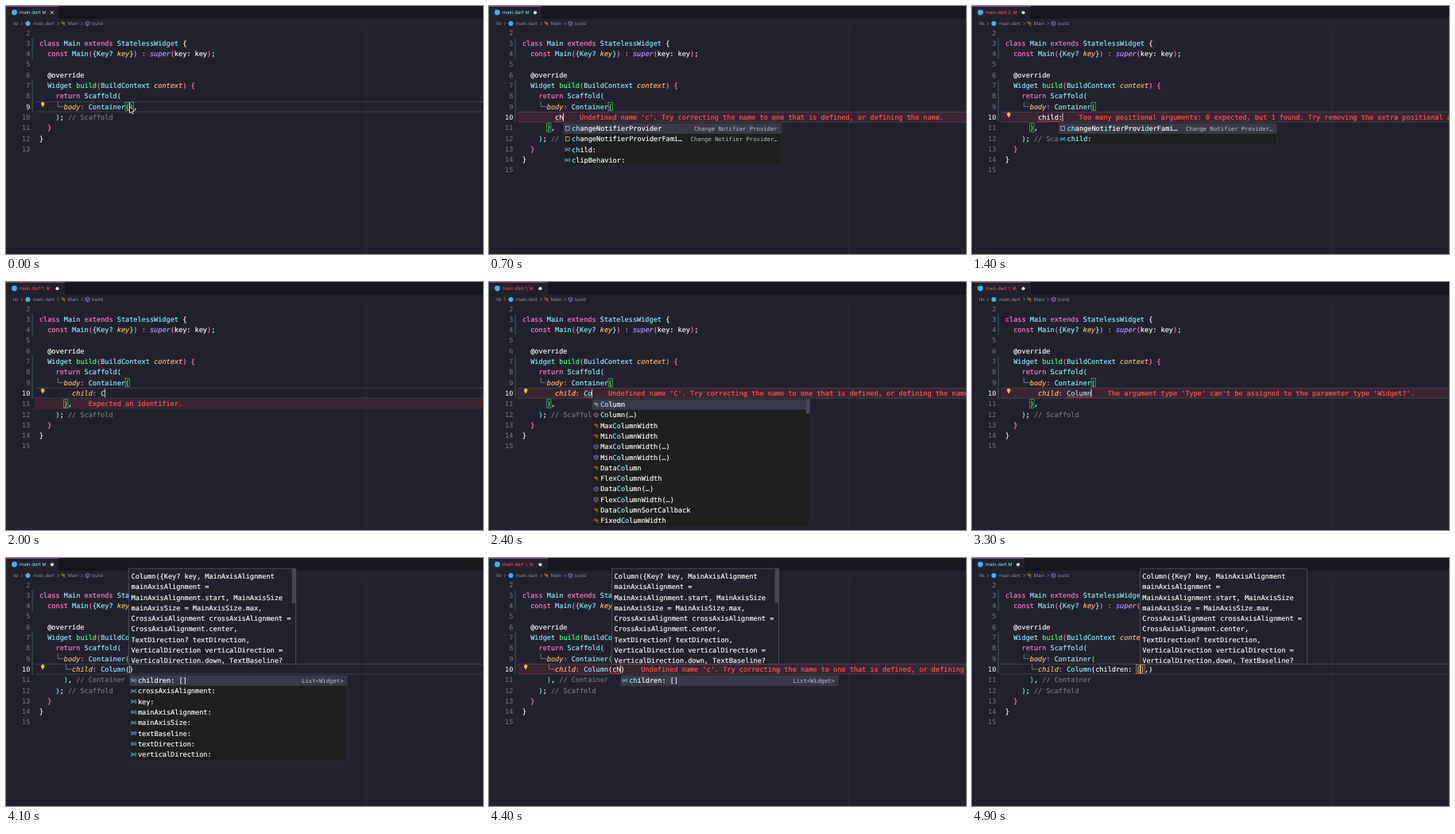
An HTML page with a canvas for the animation above (5000 ms loop, 600 px wide and 312 px high).

```html
<!DOCTYPE html>
<html lang="en">
<head>
<meta charset="utf-8">
<style>
html, body { margin: 0; width: 100%; height: 100%; overflow: hidden; background: #22222d; }
canvas { display: block; width: 600px; height: 312px; }
</style>
</head>
<body>
<canvas id="stage"></canvas>
<script>
const W = 600, H = 312, LOOP = 5000;
const CW = 5.15, LH = 13.3, LEFT = 41.9;
const MONO = '"DejaVu Sans Mono", monospace';
const SANS = 'Inter, "Open Sans", sans-serif';
const C = {
  w: '#f8f8f2', p: '#ff79c6', c: '#8be9fd', g: '#50fa7b', o: '#ffb86c',
  v: '#bd93f9', k: '#74747e', bg: '#22222d', strip: '#17171e', red: '#ff5555',
  list: '#1f1f20', edge: '#2c2c32', tipEdge: '#5a5a63', dim: '#8a8a9a'
};

const canvas = document.getElementById('stage');
const ctx = canvas.getContext('2d');
const dpr = window.devicePixelRatio || 1;
canvas.width = W * dpr;
canvas.height = H * dpr;
ctx.scale(dpr, dpr);
ctx.textRendering = 'geometricPrecision';

const colX = n => LEFT + n * CW;
const rowY = n => 33.5 + (n - 2) * LH;
const rowTop = n => rowY(n) - LH / 2;

function rect(x, y, w, h, color) {
  ctx.fillStyle = color;
  ctx.fillRect(x, y, w, h);
}

function frame(x, y, w, h, color, width = 0.7) {
  ctx.strokeStyle = color;
  ctx.lineWidth = width;
  ctx.strokeRect(x, y, w, h);
}

function dot(x, y, r, color) {
  ctx.fillStyle = color;
  ctx.beginPath();
  ctx.arc(x, y, r, 0, Math.PI * 2);
  ctx.fill();
}

function path(points, color, width = 0.7) {
  ctx.strokeStyle = color;
  ctx.lineWidth = width;
  ctx.beginPath();
  points.forEach(([x, y]) => ctx.lineTo(x, y));
  ctx.stroke();
}

function text(s, x, y, color, font, align = 'left') {
  ctx.font = font;
  ctx.fillStyle = color;
  ctx.textAlign = align;
  ctx.fillText(s, x, y);
}

// A hairline outline gives the code its slightly heavier weight.
function mono(s, x, y, color, italic) {
  text(s, x, y + 3, color, (italic ? 'italic ' : '') + '8.55px ' + MONO);
  ctx.strokeStyle = color;
  ctx.lineWidth = 0.18;
  ctx.strokeText(s, x, y + 3);
}

// Spans are "style:text" joined by "|"; an upper-case style means italic.
const spans = src => src.split('|').map(s => [s[0], s.slice(2)]);

function code(row, col, src) {
  for (const [style, s] of spans(src)) {
    const key = style.toLowerCase();
    mono(s, colX(col), rowY(row), C[key], style !== key);
    col += s.length;
  }
}

const HEAD = [
  [3, 0, 'p:class |c:Main |p:extends |c:StatelessWidget |w:{'],
  [4, 2, 'p:const |c:Main|p:(|c:{Key? |O:key|c:}|p:) : |V:super|p:(|w:key: key|p:)|w:;'],
  [6, 2, 'w:@override'],
  [7, 2, 'c:Widget |g:build|p:(|c:BuildContext |O:context|p:) {'],
  [8, 4, 'p:return |c:Scaffold('],
  [9, 6, 'O:body|p:: |c:Container|g:(']
];

const FIELD = 'f', CLS = 'c', CTOR = 'm', SNIP = 's';
const family = [SNIP, 'changeNotifierProviderFami…', 'Change Notifier Provider…'];
const child = [FIELD, 'child:'];
const chMenu = [
  [SNIP, 'changeNotifierProvider', 'Change Notifier Provider'],
  family, child, [FIELD, 'clipBehavior:']
];
const columnMenu = [
  [CLS, 'Column'], [CTOR, 'Column(…)'], [CLS, 'MaxColumnWidth'], [CLS, 'MinColumnWidth'],
  [CTOR, 'MaxColumnWidth(…)'], [CTOR, 'MinColumnWidth(…)'], [CLS, 'DataColumn'],
  [CLS, 'FlexColumnWidth'], [CTOR, 'DataColumn(…)'], [CTOR, 'FlexColumnWidth(…)'],
  [CLS, 'DataColumnSortCallback'], [CLS, 'FixedColumnWidth']
];
const children = [FIELD, 'children: []', 'List<Widget>'];
const cross = [FIELD, 'crossAxisAlignment:'];
const argMenu = [children, cross].concat(
  ['key:', 'mainAxisAlignment:', 'mainAxisSize:', 'textBaseline:', 'textDirection:', 'verticalDirection:']
    .map(s => [FIELD, s]));

const SIGNATURE = [
  'Column({Key? key, MainAxisAlignment', 'mainAxisAlignment =',
  'MainAxisAlignment.start, MainAxisSize', 'mainAxisSize = MainAxisSize.max,',
  'CrossAxisAlignment crossAxisAlignment =', 'CrossAxisAlignment.center,',
  'TextDirection? textDirection,', 'VerticalDirection verticalDirection =',
  'VerticalDirection.down, TextBaseline?'
];

const undef = s => [10, `Undefined name '${s}'. Try correcting the name to one that is defined, or defining the name.`];
const extra = [10, 'Too many positional arguments: 0 expected, but 1 found. Try removing the extra positional arguments.'];
const noIdent = [11, 'Expected an identifier.'];
const badType = [10, "The argument type 'Type' can't be assigned to the parameter type 'Widget?'."];
const menu = (col, query, items) => ({ col, query, items });
const arg = rest => 'O:child|p:: |' + rest;
const call = rest => arg('c:Column|w:(|' + rest + '|w:)');
const list = 'w:children: |o:[]|w:,';

// Each step overrides part of the editor state from its time on.
const steps = [
  [0, { open: false, mouse: true, line: '', caret: 22, bulb: true, errors: 0, err: null, menu: null, sig: 0, tree: false, label: false }],
  [200, { open: true, mouse: false, bulb: false, caret: 8 }],
  [500, { line: 'w:c', caret: 9 }],
  [600, { err: undef('c') }],
  [700, { line: 'w:ch', caret: 10, menu: menu(10, 'ch', chMenu) }],
  [800, { errors: 1 }],
  [900, { line: 'w:chi', caret: 11, menu: menu(11, 'chi', chMenu), err: undef('ch') }],
  [1000, { line: 'w:chil', caret: 12, menu: menu(12, 'chil', [family, child]) }],
  [1200, { line: 'w:child', caret: 13, menu: menu(13, 'child', [family, child]), err: extra, errors: 2, bulb: true }],
  [1400, { line: 'w:child:', caret: 14 }],
  [1500, { menu: null }],
  [1600, { line: arg('w: '), caret: 15 }],
  [1700, { err: noIdent }],
  [1900, { errors: 1 }],
  [2000, { line: arg('C:C'), caret: 16 }],
  [2200, { menu: menu(16, 'c', columnMenu), err: undef('C') }],
  [2300, { line: arg('C:Co'), caret: 17, menu: menu(17, 'co', columnMenu) }],
  [2500, { line: arg('C:Col'), caret: 18, menu: menu(18, 'col', columnMenu), err: undef('Co') }],
  [2600, { line: arg('C:Colu'), caret: 19, menu: menu(19, 'colu', columnMenu) }],
  [2700, { line: arg('C:Colum'), caret: 20, menu: menu(20, 'colum', columnMenu), err: undef('Colum') }],
  [3000, { line: arg('c:Column'), caret: 21, menu: menu(21, 'column', columnMenu) }],
  [3300, { menu: null, err: badType }],
  [3700, { line: call('w:'), caret: 22, sig: 22, menu: menu(22, '', argMenu) }],
  [3800, { err: null, errors: 0, tree: true, label: true }],
  [4200, { line: call('w:c'), caret: 23, menu: menu(23, 'c', [children, cross]) }],
  [4400, { line: call('w:ch'), caret: 24, menu: menu(24, 'ch', [children]), err: undef('c'), errors: 1 }],
  [4600, { line: call(list), caret: 33, menu: null, sig: 33, err: null, tree: false, bulb: false }],
  [4900, { errors: 0, tree: true }]
];

const stateAt = t => Object.assign({}, ...steps.filter(s => s[0] <= t).map(s => s[1]));

function classIcon(x, y, color) {
  path([[x - 2.5, y - 1], [x - 1, y - 2.6], [x + 0.4, y - 1.2], [x - 1.1, y + 0.4], [x - 2.5, y - 1]], color);
  path([[x, y - 0.6], [x + 2.6, y - 0.6]], color);
  path([[x + 0.8, y - 0.6], [x + 0.8, y + 2], [x + 2.6, y + 2]], color);
}

function cubeIcon(x, y, color) {
  path([[x, y - 2.8], [x + 2.5, y - 1.5], [x + 2.5, y + 1.5], [x, y + 2.8],
    [x - 2.5, y + 1.5], [x - 2.5, y - 1.5], [x, y - 2.8]], color);
  path([[x - 2.5, y - 1.5], [x, y - 0.2], [x + 2.5, y - 1.5]], color, 0.6);
  path([[x, y - 0.2], [x, y + 2.8]], color, 0.6);
}

function fieldIcon(x, y, color) {
  path([[x - 1.6, y - 2], [x - 2.8, y - 2], [x - 2.8, y + 2], [x - 1.6, y + 2]], color);
  path([[x + 1.6, y - 2], [x + 2.8, y - 2], [x + 2.8, y + 2], [x + 1.6, y + 2]], color);
  frame(x - 1, y - 0.9, 2, 1.8, color, 0.7);
}

function itemIcon(kind, x, y, selected) {
  if (kind === SNIP) frame(x - 2.4, y - 2.6, 4.8, 5, '#c5c5c5');
  else if (kind === FIELD) fieldIcon(x, y, '#75beff');
  else if (kind === CLS) classIcon(x, y, selected ? '#d0d0d0' : '#ee9d28');
  else cubeIcon(x, y, '#b180d7');
}

function drawHeader(s) {
  const tabW = s.errors ? 74 : 66;
  rect(0, 0, W, 16, C.strip);
  rect(0, 0, tabW, 16, C.bg);
  rect(0, 0, tabW, 0.8, '#8f4f78');
  dot(10.5, 8, 3.4, '#3fb4ee');
  const color = s.errors ? C.red : C.c;
  text('main.dart', 17, 10.3, color, '6px ' + SANS);
  text(s.errors ? s.errors + ', M' : 'M', 45.5, 10.1, color, '5.4px ' + SANS);
  const x = s.errors ? 64.5 : 58;
  if (s.open) dot(x, 8.3, 2, C.w);
  else {
    path([[x - 2, 6.2], [x + 2, 10.2]], C.w, 0.8);
    path([[x + 2, 6.2], [x - 2, 10.2]], C.w, 0.8);
  }
  const crumb = '6px ' + SANS;
  [['lib', 9], ['main.dart', 34], ['Main', 77.5], ['build', 108]]
    .forEach(([word, at]) => text(word, at, 24.2, C.dim, crumb));
  [20, 65.5, 95.5].forEach(at => path([[at - 1, 20], [at + 1, 22], [at - 1, 24]], C.dim));
  dot(27.5, 22, 3, '#3fb4ee');
  classIcon(72, 22, '#ee9d28');
  cubeIcon(102.5, 22, '#b180d7');
}

function drawGutter(last, active) {
  for (let n = 2; n <= last; n++) {
    text(n, 30.3, rowY(n) + 3, n === active ? C.w : '#767682', '8.55px ' + MONO, 'right');
  }
  rect(32.6, rowTop(3), 1, LH * 2, '#375a68');
  rect(32.6, rowTop(7), 1, LH * (active - 6), '#375a68');
}

function bracket(row, col, color) {
  frame(colX(col), rowTop(row) + 1.2, CW, LH - 2.6, color, 0.5);
}

function branch(row, col) {
  const x = colX(col) - 7.5, y = rowY(row);
  path([[x, y - 6], [x, y], [x + 7, y]], '#8b8b94', 0.8);
}

function bulb(row) {
  const y = rowY(row);
  dot(46.2, y - 3.7, 2.2, '#fbc02d');
  rect(45.2, y - 1.9, 2, 1.8, '#fbc02d');
}

function squiggle(from, to, row) {
  const points = [];
  for (let x = colX(from), i = 0; x <= colX(to); x += 1.3, i++) points.push([x, rowTop(row) + LH - 1.2 - (i % 2)]);
  path(points, C.red, 0.7);
}

function drawCode(s) {
  const active = s.open ? 10 : 9;
  const end = s.open ? 11 : 9;
  const top = Math.round(rowTop(active));
  rect(452.5, 28, 0.7, H - 28, '#32313d');
  if (s.err) rect(36, rowTop(s.err[0]), W - 36, LH, '#3b2530');
  rect(36, top, W - 36, 0.8, '#444552');
  rect(36, top + 12.6, W - 36, 0.8, '#444552');
  drawGutter(s.open ? 15 : 13, active);
  HEAD.forEach(line => code(...line));
  branch(9, 6);

  if (s.open) {
    code(10, 8, s.line || 'w:');
    code(11, 6, 'g:)|w:,' + (s.label ? '|k: // Container' : ''));
    if (s.tree) branch(10, 8);
  } else code(9, 22, 'g:)|w:,');
  code(end + 1, 4, 'c:)|w:;|k: // Scaffold');
  code(end + 2, 2, 'p:}');
  code(end + 3, 0, 'w:}');

  if (!s.open) {
    bracket(9, 21, C.g);
    bracket(9, 22, C.g);
  } else if (s.sig === 33) {
    bracket(10, 32, C.o);
    bracket(10, 33, C.o);
  } else if (!s.sig) {
    bracket(9, 21, C.g);
    bracket(11, 6, C.g);
  }
  if (s.err) {
    const [row, message] = s.err;
    const stop = row === 10 ? 8 + spans(s.line).reduce((n, p) => n + p[1].length, 0) : 8;
    mono(message, colX(stop + 4), rowY(row), C.red);
    if (row === 10) squiggle(s.sig ? 22 : s.caret > 15 ? 15 : 8, s.caret, row);
    else squiggle(6, 7, row);
  }
  if (s.bulb) bulb(active);
  rect(colX(s.caret) - 0.4, rowTop(active) + 1.5, 0.8, LH - 3, C.w);
}

function matches(label, query) {
  const low = label.toLowerCase(), at = low.indexOf(query);
  const hit = new Set();
  let from = 0;
  [...query].forEach((ch, i) => {
    const k = at >= 0 ? at + i : low.indexOf(ch, from);
    if (k >= 0) { hit.add(k); from = k + 1; }
  });
  return hit;
}

function drawMenu({ col, query, items }) {
  const x = colX(col), y = rowTop(11) + 0.4, w = 274.5, h = items.length * LH + 1;
  rect(x, y, w, h, C.list);
  rect(x, y + 0.5, w, LH, '#383a48');
  items.forEach(([kind, label, detail], i) => {
    const cy = y + 0.4 + (i + 0.5) * LH, hit = matches(label, query);
    itemIcon(kind, x + 5.3, cy, i === 0);
    [...label].forEach((ch, k) => mono(ch, x + 10.7 + k * CW, cy, hit.has(k) ? C.c : C.w));
    if (detail) text(detail, x + 269.3, cy + 2.6, '#bcbcc2', '7.25px ' + MONO, 'right');
  });
  if (items.length > 10) rect(x + w - 5, y + 0.5, 4.5, 18, '#4a4a55');
  frame(x, y, w, h, C.edge);
}

function drawSignature(col, scrollbar) {
  const x = colX(col) - 0.6, y = 13.2, w = 210, h = 120.2;
  rect(x, y, w, h, C.bg);
  ctx.save();
  ctx.beginPath();
  ctx.rect(x, y, w, h);
  ctx.clip();
  SIGNATURE.forEach((line, i) => mono(line, x + 3, 23 + i * 13.27, C.w));
  ctx.restore();
  if (scrollbar) rect(x + w - 5, y + 0.5, 4.5, 43, '#48484f');
  frame(x, y, w, h, C.tipEdge);
}

function drawMouse(x, y) {
  ctx.beginPath();
  [[0, 0], [0, 8.2], [1.9, 6.5], [3.2, 9.3], [4.5, 8.7], [3.3, 6], [5.8, 5.8]]
    .forEach(([dx, dy]) => ctx.lineTo(x + dx, y + dy));
  ctx.closePath();
  ctx.fillStyle = '#000';
  ctx.fill();
  ctx.strokeStyle = '#fff';
  ctx.lineWidth = 0.8;
  ctx.stroke();
}

function draw(t) {
  const s = stateAt(t);
  rect(0, 0, W, H, C.bg);
  drawCode(s);
  drawHeader(s);
  if (s.menu) drawMenu(s.menu);
  if (s.sig) drawSignature(s.sig, s.menu);
  if (s.mouse) drawMouse(155.5, 126.5);
}

function tick() {
  draw(performance.now() % LOOP);
  requestAnimationFrame(tick);
}
tick();
</script>
</body>
</html>
```
